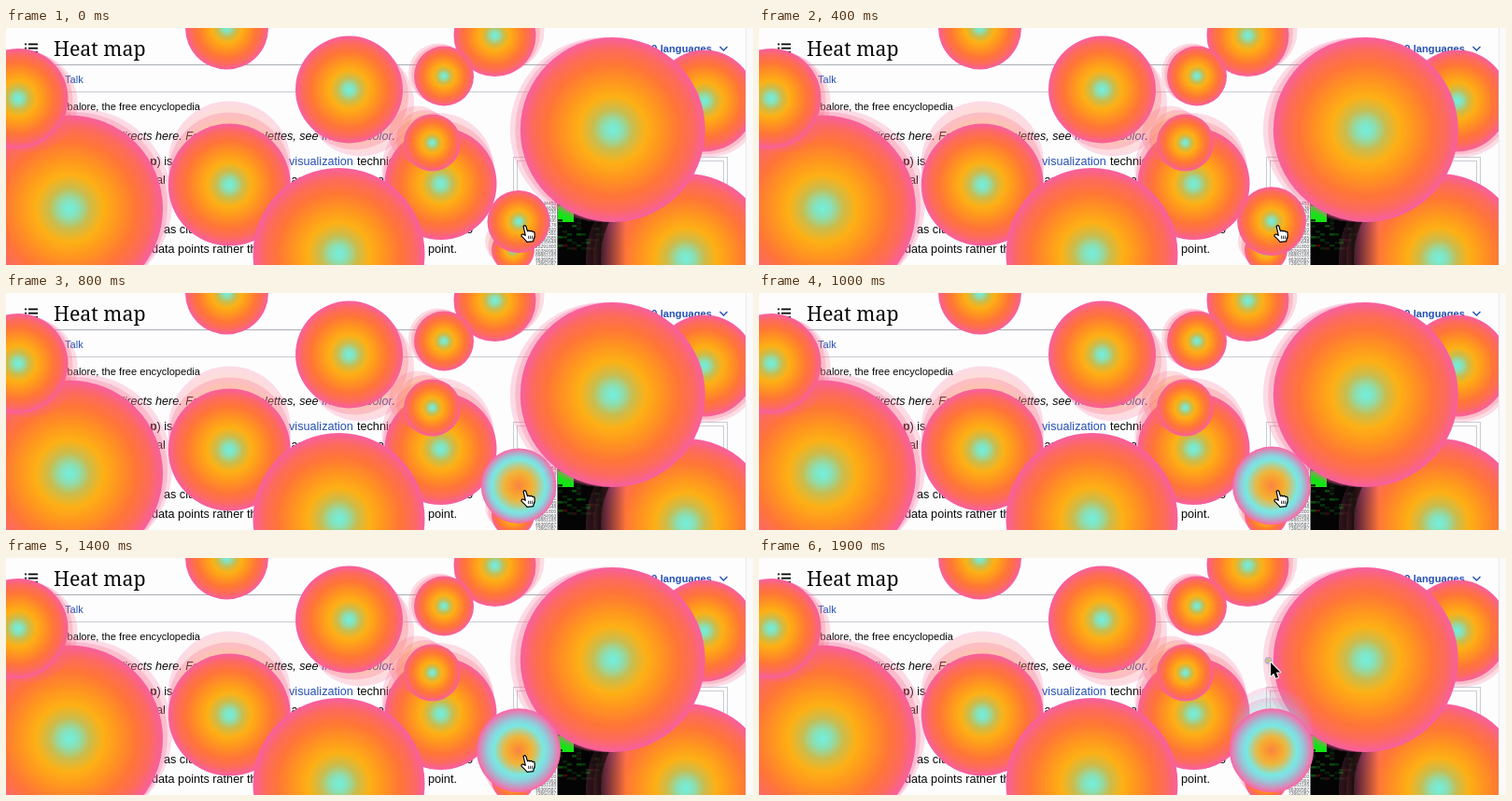
An HTML page with a canvas that plays this animation: 800 by 254 pixels, repeating every 2 s.

```html
<!DOCTYPE html>
<html lang="en">
<head>
<meta charset="utf-8">
<title>Heat map</title>
<style>
html, body { margin: 0; width: 100%; height: 100%; overflow: hidden; background: #fdfdfd; }
canvas { display: block; width: 800px; height: 254px; }
</style>
</head>
<body>
<canvas id="stage"></canvas>
<script>
const W = 800, H = 254, PAGE = 792, LOOP = 2000, STEP = 100;
const canvas = document.getElementById('stage');
const ctx = canvas.getContext('2d');
const dpr = window.devicePixelRatio || 1;
canvas.width = W * dpr;
canvas.height = H * dpr;

const SANS = '"Liberation Sans", Arial, sans-serif';
const BODY = '12.65px ' + SANS;
const ITALIC = 'italic 12.6px ' + SANS;
const SMALL = '11.1px ' + SANS;
const INK = '#08090a', LINK = '#2450b4';

const HOT = [[0, '#72f0e0'], [.1, '#8adfb4'], [.22, '#cabc4c'], [.36, '#fdb015'],
  [.52, '#ff961f'], [.72, '#ff7538'], [.87, '#fd6a5e'], [1, '#f75fa0']];

// x, y, radius, then the offset of the farthest trailing ghost
const SPOTS = [
  [236.5, 0, 44.5, 0, 0],
  [523.5, 8, 44, 9, -5],
  [367.5, 66, 57.5, 12, 14],
  [469, 51.5, 32, -6, -3],
  [68, 193.5, 100, 10, -7],
  [13, 75.5, 53.5, 10, 4],
  [239.3, 168, 65.5, 0, -24],
  [465.5, 167, 60, -3, -16],
  [456.5, 123, 30.5, -16, -9],
  [356.5, 242, 92, 0, 0],
  [748, 78, 54.5, 5, 6],
  [728, 247, 91, -16, 0],
  [649.8, 109, 99, -11, 0],
  [543, 238, 23, -7, -9]
];

function text(str, x, y, font, color = INK, align = 'left') {
  ctx.font = font;
  ctx.fillStyle = color;
  ctx.textAlign = align;
  ctx.fillText(str, x, y);
}

function box(x, y, w, h, color) {
  ctx.fillStyle = color;
  ctx.fillRect(x, y, w, h);
}

function seeded(seed) {
  return () => (seed = (seed * 16807) % 2147483647) / 2147483647;
}

function drawHeader() {
  for (let i = 0; i < 3; i++) {
    const y = 16.5 + i * 4.3;
    box(20, y, 2, 1.8, INK);
    box(24, y, 10, 1.8, INK);
  }
  text('Heat map', 51, 30, '21.3px "Noto Serif", serif');
  text('9 languages', 756, 26, 'bold 11.2px ' + SANS, LINK, 'right');
  ctx.strokeStyle = LINK;
  ctx.lineWidth = 1.4;
  ctx.beginPath();
  ctx.moveTo(764.5, 20);
  ctx.lineTo(768.5, 24);
  ctx.lineTo(772.5, 20);
  ctx.stroke();
  box(20, 39, 753, 1, '#a9aeb4');
  text('Talk', 63, 59, SMALL, LINK);
  box(20, 68, 753, 1, '#c8ccd1');
  text('rbalore, the free encyclopedia', 208, 88, SMALL, INK, 'right');
}

function drawArticle() {
  text('directs here. For', 119.5, 120, ITALIC);
  text('palettes, see', 334.5, 120, ITALIC, INK, 'right');
  text('Indexed color', 338, 120, ITALIC, LINK);
  text('.', 413.5, 120, ITALIC);
  text('p', 154, 146.5, 'bold ' + BODY);
  text(') is a', 161.5, 146.5, BODY);
  text('visualization', 303, 146.5, BODY, LINK);
  text('technique', 376, 146.5, BODY);
  text('al', 161, 166.5, BODY);
  text('as', 305.5, 166.5, BODY);
  text('a', 398, 166.5, BODY);
  text('as cluster', 169, 220, BODY);
  text('to', 500, 220, BODY, INK, 'right');
  text('data points rather than', 156, 240.5, BODY);
  text('point.', 452, 240.5, BODY);
}

function drawFigure() {
  const rnd = seeded(71);
  ctx.strokeStyle = '#c8ccd1';
  ctx.lineWidth = 1;
  ctx.strokeRect(543.5, 138.5, 229, 130);
  ctx.strokeRect(547.5, 142.5, 221, 130);
  for (let y = 190; y < 258; y += 4.6) {
    const code = Math.floor(1e7 + rnd() * 8e7);
    text(String(code), 567, y, '5px ' + SANS, '#55585c');
  }
  box(590.5, 187, 179, 70, '#030403');
  box(591, 190, 17, 18, '#16e216');
  box(591, 187, 6, 4, '#0a8a0a');
  for (let i = 0; i < 42; i++) {
    const x = 591 + Math.floor(rnd() * 10) * 5;
    const y = 205 + Math.floor(rnd() * 11) * 3;
    const level = Math.floor(20 + rnd() * 70);
    box(x, y, 5, 2.5, rnd() < .7 ? `rgb(8,${level},12)` : `rgb(${level},8,16)`);
  }
}

// Darkens the rim where the lower right spot blends into the black figure
function drawShade() {
  const fade = ctx.createLinearGradient(618, 0, 664, 0);
  fade.addColorStop(0, 'rgba(3,4,3,0)');
  fade.addColorStop(.4, 'rgba(3,4,3,.75)');
  fade.addColorStop(1, 'rgba(3,4,3,0)');
  box(618, 200, 46, 54, fade);
}

function disc(x, y, r, stops, alpha = 1) {
  const fill = ctx.createRadialGradient(x, y, 0, x, y, r);
  for (const [at, color] of stops) fill.addColorStop(at, color);
  ctx.globalAlpha = alpha;
  ctx.fillStyle = fill;
  ctx.beginPath();
  ctx.arc(x, y, r, 0, Math.PI * 2);
  ctx.fill();
  ctx.globalAlpha = 1;
}

function spot(x, y, r, dx, dy, stops = HOT) {
  if (dx || dy) {
    disc(x + dx, y + dy, r, stops, .22);
    disc(x + dx / 2, y + dy / 2, r, stops, .26);
  }
  disc(x, y, r, stops);
}

// Reversed palette whose cyan ring sits at the given fraction of the radius
function ringStops(ring) {
  return [[0, '#f8834a'], [ring * .25, '#fb9a30'], [ring * .55, '#efb53a'],
    [ring * .78, '#b8cc8c'], [ring, '#78e8e2'],
    [ring + (1 - ring) * .3, '#8cd2de'], [ring + (1 - ring) * .6, '#b4a8c8'],
    [ring + (1 - ring) * .85, '#e57eb2'], [1, '#fa62a8']];
}

function drawGrowing(t) {
  const held = Math.min(t, 1350);
  const radius = 33.5 + held * .0085;
  const stops = t < 700 ? HOT : ringStops(.72 - (held - 700) * .0002);
  const lift = t < 1500 ? 0 : -23;
  spot(549, 207.5 - held * .001, radius, 0, lift, stops);
}

function outline(points) {
  ctx.beginPath();
  for (const [x, y] of points) ctx.lineTo(x, y);
  ctx.closePath();
}

function drawArrow(x, y) {
  ctx.save();
  ctx.translate(x, y);
  outline([[0, 0], [0, 14.5], [3.3, 11.5], [5.6, 16.8], [8, 15.7], [5.8, 10.6], [10.3, 10.4]]);
  ctx.lineJoin = 'round';
  ctx.lineWidth = 2;
  ctx.strokeStyle = '#fff';
  ctx.stroke();
  ctx.fillStyle = '#000';
  ctx.fill();
  ctx.restore();
}

function drawHand(x, y) {
  ctx.save();
  ctx.translate(x, y);
  ctx.beginPath();
  ctx.moveTo(-1.4, 1);
  ctx.quadraticCurveTo(0, -1, 1.4, 1);
  ctx.lineTo(3, 6);
  ctx.quadraticCurveTo(4.6, 4.6, 5.6, 6.2);
  ctx.quadraticCurveTo(7.4, 5, 8.2, 6.8);
  ctx.quadraticCurveTo(10, 6, 10.6, 8);
  ctx.quadraticCurveTo(11.4, 12, 9.4, 15.5);
  ctx.lineTo(9.2, 17);
  ctx.lineTo(2.6, 17.6);
  ctx.quadraticCurveTo(0, 14.5, -3.4, 11.4);
  ctx.quadraticCurveTo(-4, 8.8, -1.6, 9.4);
  ctx.lineTo(.8, 10.6);
  ctx.closePath();
  ctx.fillStyle = '#fff';
  ctx.fill();
  ctx.lineWidth = 1.2;
  ctx.lineJoin = 'round';
  ctx.strokeStyle = '#000';
  ctx.stroke();
  ctx.lineWidth = .8;
  ctx.beginPath();
  for (const dx of [4, 6, 8]) {
    ctx.moveTo(dx, 11);
    ctx.lineTo(dx + .3, 14.5);
  }
  ctx.stroke();
  ctx.restore();
}

function drawPointer(t) {
  if (t < 1450) return drawHand(555.5, 211.7);
  const p = Math.min((t - 1400) / 200, 1);
  const ease = p * p * (3 - 2 * p);
  drawArrow(555.5 - 7.5 * ease, 211.7 - 99.7 * ease);
}

function draw(t) {
  ctx.setTransform(dpr, 0, 0, dpr, 0, 0);
  box(0, 0, W, H, '#fdfdfd');
  drawHeader();
  drawArticle();
  drawFigure();
  ctx.save();
  ctx.beginPath();
  ctx.rect(0, 0, PAGE, H);
  ctx.clip();
  SPOTS.forEach((s, i) => {
    if (i === SPOTS.length - 2) drawShade();
    spot(...s);
  });
  drawGrowing(t);
  if (t >= 1800) {
    const r = 3 + (t - 1800) * .01;
    disc(545.5, 110, r, [[0, '#d8bd58'], [.4, '#c9c389'], [.7, '#aab6cd'], [1, '#d9a9cc']]);
  }
  ctx.restore();
  box(PAGE, 0, 1, H, '#e9e9e9');
  box(PAGE + 1, 0, 7, H, '#fafafa');
  drawPointer(t);
}

function tick(now) {
  draw(Math.floor((now % LOOP) / STEP) * STEP);
  requestAnimationFrame(tick);
}
tick(performance.now());
</script>
</body>
</html>
```
